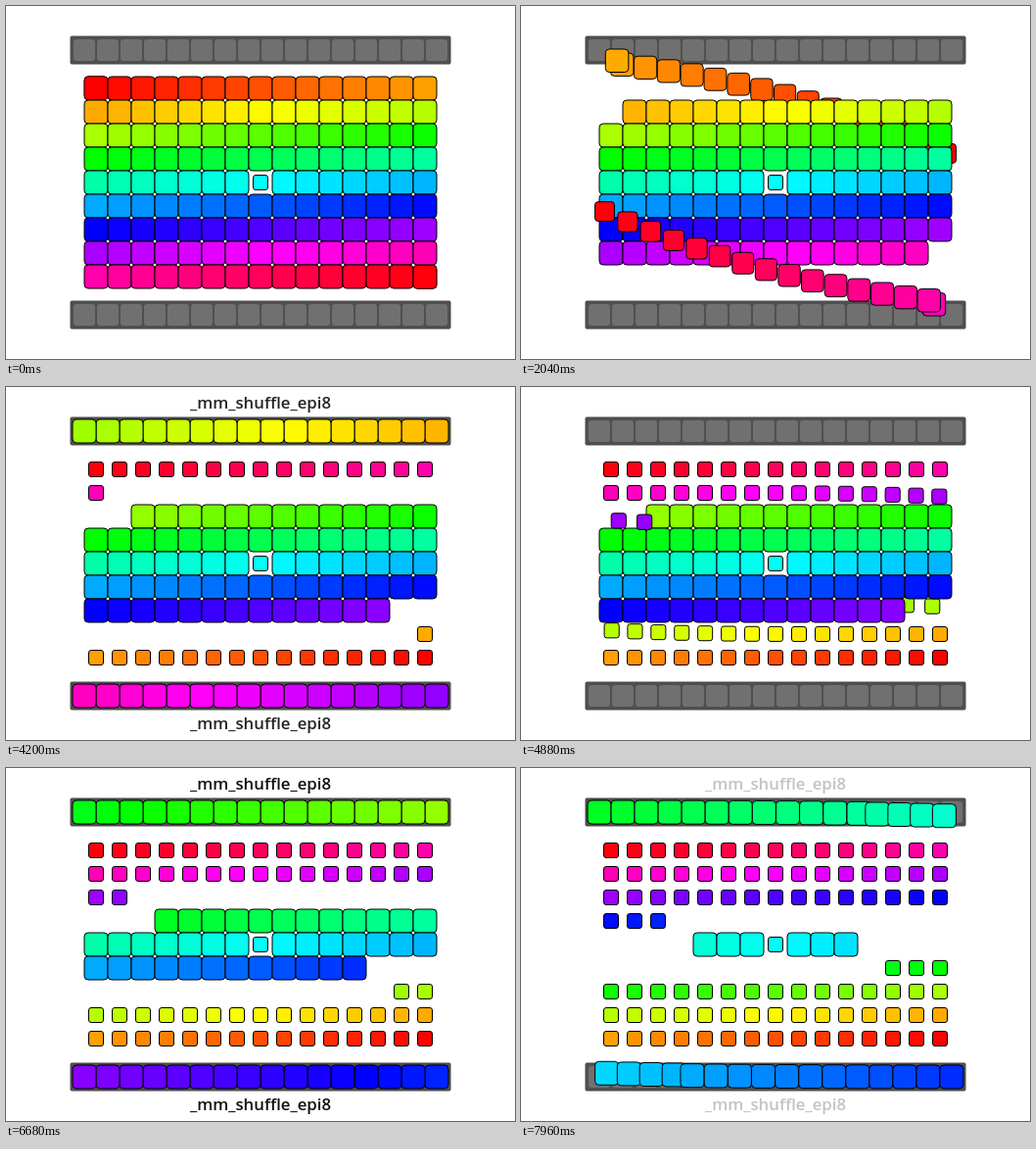
An HTML page with a canvas for the animation above (8000 ms loop, 520 px wide and 360 px high).

```html
<!DOCTYPE html>
<html lang="en">
<head>
<meta charset="utf-8">
<title>Reversing an array with byte shuffles</title>
<style>
  html, body { margin: 0; width: 100%; height: 100%; overflow: hidden; background: #fff; }
  canvas { display: block; width: 520px; height: 360px; }
</style>
</head>
<body>
<canvas id="stage"></canvas>
<script>
const WIDTH = 520, HEIGHT = 360, LOOP = 8000;
const COUNT = 135, COLUMNS = 15, LANES = 16, CELL = 24, RADIUS = 4, DONE_SCALE = 0.625;
const ROUND = 2500, STAGGER = 10;
const LOAD = { start: 0, length: 525 };
const REVERSE = { start: ROUND / 3, length: 460 };
const STORE = { start: 1750, length: 600 };
const SHOW_LABEL = { start: 400, length: 255 };
const HIDE_LABEL = { start: ROUND * 2 / 3, length: 250 };

const canvas = document.getElementById('stage');
const ctx = canvas.getContext('2d');
const ratio = window.devicePixelRatio || 1;
canvas.width = WIDTH * ratio;
canvas.height = HEIGHT * ratio;

const progress = (time, { start, length }) => Math.min(1, Math.max(0, (time - start) / length));
const easeOut = (x, power) => 1 - (1 - x) ** power;
const easeInOut = x => x < 0.5 ? 4 * x ** 3 : 1 - 4 * (1 - x) ** 3;
const mix = (a, b, x) => a + (b - a) * x;
const mixPose = (a, b, x) => ({
  x: mix(a.x, b.x, x), y: mix(a.y, b.y, x), scale: mix(a.scale, b.scale, x)
});
const mirror = pose => ({ ...pose, x: WIDTH - pose.x, y: HEIGHT - pose.y });

const home = (index, scale = 1) => ({
  x: 92 + CELL * (index % COLUMNS), y: 84 + CELL * Math.floor(index / COLUMNS), scale
});
const lanePose = lane => ({ x: 80 + CELL * lane, y: 45, scale: 1 });

// Pose of an element in the first half; the second half is its point reflection.
function frontPose(index, round, time) {
  const batch = Math.floor(index / LANES), lane = index % LANES;
  const finalPose = home(COUNT - 1 - index, DONE_SCALE);
  if (index === (COUNT - 1) / 2 || batch < round) return finalPose;
  if (batch > round) return home(index);

  const local = time - lane * STAGGER;
  const loaded = lanePose(lane), reversed = lanePose(LANES - 1 - lane);
  if (time < REVERSE.start) return mixPose(home(index), loaded, easeOut(progress(local, LOAD), 4));
  if (time < STORE.start) return mixPose(loaded, reversed, easeOut(progress(time, REVERSE), 3));
  return mixPose(reversed, finalPose, easeInOut(progress(local, STORE)));
}

function box(x, y, width, height, radius, fill, stroke, lineWidth) {
  ctx.beginPath();
  ctx.roundRect(x - width / 2, y - height / 2, width, height, radius);
  ctx.fillStyle = fill;
  ctx.fill();
  ctx.strokeStyle = stroke;
  ctx.lineWidth = lineWidth;
  ctx.stroke();
}

function drawRegister(y) {
  box(WIDTH / 2, y, LANES * CELL + 4, CELL + 4, 1, '#505050', '#484848', 1);
  for (let lane = 0; lane < LANES; lane++) {
    box(lanePose(lane).x, y, CELL, CELL, RADIUS, '#707070', '#505050', 2);
  }
}

function drawCell(index, { x, y, scale }) {
  const size = CELL * scale;
  const color = `hsl(${360 * index / COUNT}, 100%, 50%)`;
  box(x, y, size, size, RADIUS * scale, color, '#000', 1);
}

function drawLabels(alpha) {
  ctx.font = '600 16.8px "Open Sans", "Noto Sans", sans-serif';
  ctx.textAlign = 'center';
  ctx.fillStyle = `rgba(0, 0, 0, ${alpha})`;
  for (const baseline of [22, 348.5]) ctx.fillText('_mm_shuffle_epi8', WIDTH / 2, baseline);
}

function draw(now) {
  const elapsed = now % LOOP;
  const round = Math.floor(elapsed / ROUND), time = elapsed % ROUND;
  ctx.setTransform(ratio, 0, 0, ratio, 0, 0);
  ctx.fillStyle = '#fff';
  ctx.fillRect(0, 0, WIDTH, HEIGHT);
  drawRegister(45);
  drawRegister(HEIGHT - 45);
  for (let i = 0; i < COUNT; i++) {
    const twin = COUNT - 1 - i;
    drawCell(i, i <= twin ? frontPose(i, round, time) : mirror(frontPose(twin, round, time)));
  }
  drawLabels(progress(time, SHOW_LABEL) - progress(time, HIDE_LABEL));
}

const began = performance.now();
function frame() {
  draw(performance.now() - began);
  requestAnimationFrame(frame);
}
frame();
</script>
</body>
</html>
```
